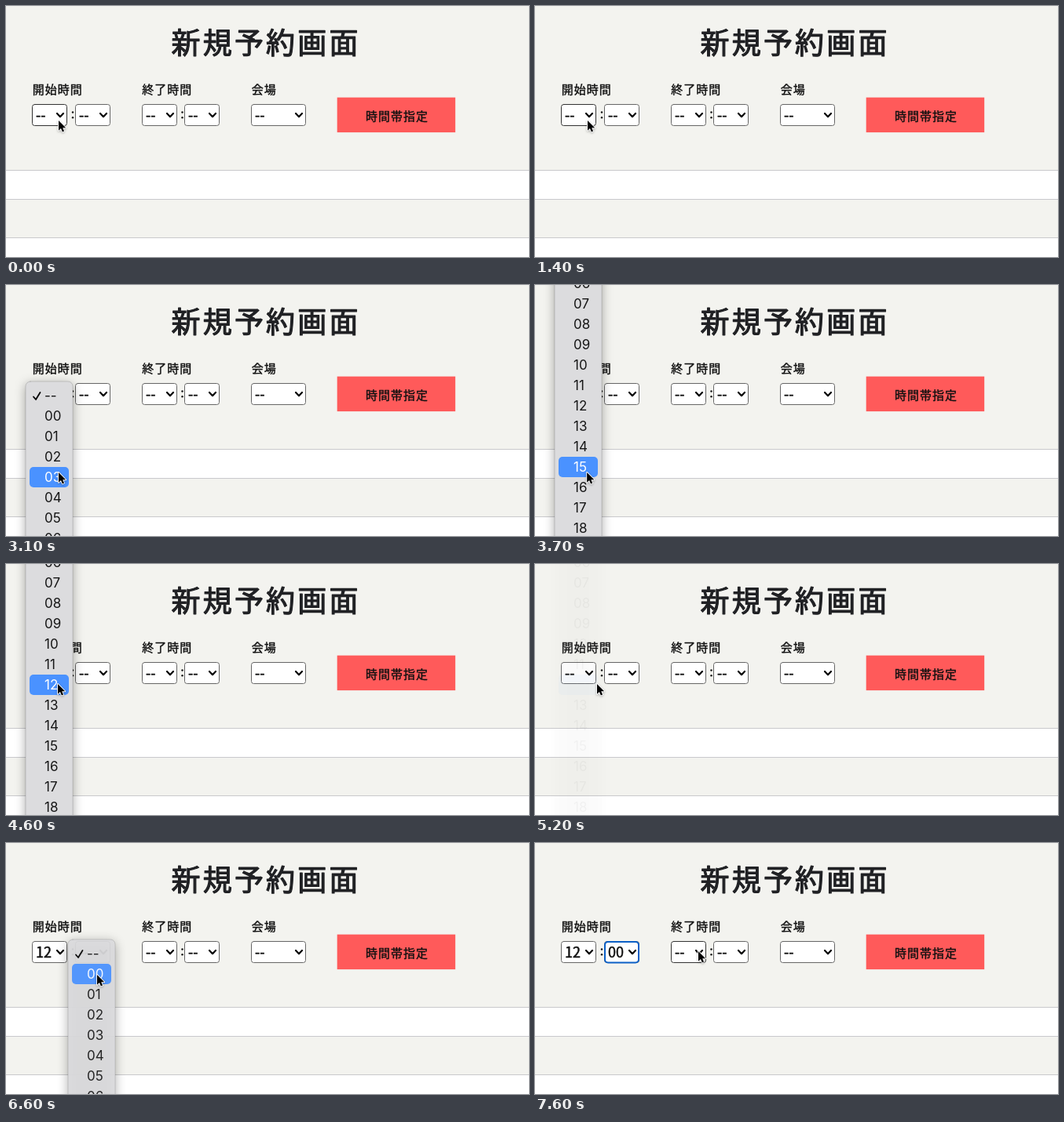
These frames come from a looping animation (666x320 px, 7700 ms). An HTML page with a canvas:

```html
<!DOCTYPE html>
<html lang="ja">
<head>
<meta charset="utf-8">
<style>
  html, body { margin: 0; width: 100%; height: 100%; overflow: hidden; background: #f3f3ef; }
  canvas { display: block; }
</style>
</head>
<body>
<canvas id="stage" width="666" height="320"></canvas>
<script>
const ctx = document.getElementById('stage').getContext('2d');
const LOOP = 7700, STEP = 100, ROW = 26;
const JP = '"Noto Sans CJK JP", "Noto Sans CJK", sans-serif';

// Pointer path: time, x, y
const path = [
  [0, 67, 146], [2200, 67, 146], [2600, 70, 197], [3100, 67, 239], [3900, 66, 239],
  [4600, 66, 153], [4900, 66, 153], [5200, 79, 153], [5700, 116, 146], [6200, 116, 146],
  [6500, 116, 168], [6900, 116, 168], [7100, 122, 152], [7500, 208, 138], [LOOP, 208, 138]
];
const menus = [
  { x: 25, open: 1900, fade: 5000, chosen: 13 },
  { x: 79, open: 6000, fade: 6600, chosen: 1 }
];
const selects = [[33, 45], [88, 45], [173, 45], [227, 45], [312, 70]];

const clamp = v => Math.min(1, Math.max(0, v));
const ease = v => v * v * (3 - 2 * v);
const pad = n => String(n).padStart(2, '0');

function pointerAt(t) {
  const i = path.findIndex(p => p[0] > t);
  const [a, b] = [path[i - 1], path[i]];
  const k = ease((t - a[0]) / (b[0] - a[0]));
  return [a[1] + (b[1] - a[1]) * k, a[2] + (b[2] - a[2]) * k];
}

function rounded(x, y, w, h, r, fill, stroke, lineWidth = 1) {
  ctx.beginPath();
  ctx.roundRect(x, y, w, h, r);
  if (fill) { ctx.fillStyle = fill; ctx.fill(); }
  if (stroke) { ctx.strokeStyle = stroke; ctx.lineWidth = lineWidth; ctx.stroke(); }
}

// A stroke with round joins softens the corners of the letters.
function softText(str, x, y, size, weight, color, spacing = 0) {
  ctx.font = `${size}px ${JP}`;
  ctx.letterSpacing = spacing + 'px';
  ctx.fillStyle = ctx.strokeStyle = color;
  ctx.lineWidth = weight;
  ctx.fillText(str, x, y);
  ctx.strokeText(str, x, y);
  ctx.letterSpacing = '0px';
}
const label = (str, x, y) => softText(str, x, y, 15, 0.4, '#111', 1);

function line(points, width, color = '#000') {
  ctx.beginPath();
  points.forEach(p => ctx.lineTo(...p));
  ctx.strokeStyle = color;
  ctx.lineWidth = width;
  ctx.stroke();
}

function drawPage() {
  ctx.fillStyle = '#f3f3ef';
  ctx.fillRect(0, 0, 666, 320);
  ctx.fillStyle = '#fff';
  ctx.fillRect(0, 210, 666, 36);
  ctx.fillRect(0, 296, 666, 24);
  ctx.fillStyle = '#c9c9cc';
  for (const y of [209, 246, 295]) ctx.fillRect(0, y, 666, 1);

  softText('新規予約画面', 210.5, 61.3, 37, 1.2, '#202124', 3.2);
  label('開始時間', 33.8, 111.5);
  label('終了時間', 173.3, 111.5);
  label('会場', 312.8, 111.5);
  ctx.fillStyle = '#ff5a5a';
  ctx.fillRect(421.7, 116.6, 150.5, 44.5);
  label('時間帯指定', 458, 145.5);
  for (const x of [85, 224.5])
    for (const y of [135.5, 142.3]) rounded(x - 1.2, y - 1.2, 2.4, 2.4, 1.2, '#111');
}

function drawSelect([x, w], value, hovered, focused) {
  rounded(x + 0.5, 125.5, w - 1, 27, 3, '#fff', hovered ? '#333' : '#666');
  if (focused) rounded(x + 1, 126, w - 2, 26.5, 4, null, '#0b5fc6', 2);
  softText(value, x + 5, 146, 18, 0.5, '#111');
  const cx = x + w - 9;
  line([[cx - 4, 137], [cx, 141.2], [cx + 4, 137]], 2.2);
}

function drawMenu(menu, t, py) {
  if (t < menu.open || t >= menu.fade + 300) return;
  const alpha = t < menu.fade ? 1 : [0.93, 0.5, 0.04][Math.floor((t - menu.fade) / STEP)];
  const scroll = menu === menus[0] ? 325 * ease(clamp((t - 3150) / 550)) : 0;
  const top = 123 - scroll, first = top + 5, height = 25 * ROW + 10;
  const active = t < menu.fade ? Math.floor((py - first) / ROW) : menu.chosen;

  ctx.save();
  ctx.globalAlpha = alpha;
  ctx.shadowColor = 'rgba(0,0,0,.35)';
  ctx.shadowBlur = 14;
  ctx.shadowOffsetY = 3;
  rounded(menu.x, top, 60, height, 6, '#dcdcde');
  ctx.shadowColor = 'transparent';
  rounded(menu.x, top, 60, height, 6, null, 'rgba(0,0,0,.14)');
  rounded(menu.x + 5, first + active * ROW, 50, ROW, 5, '#4a92ff');

  ctx.font = '17px Inter, sans-serif';
  for (let i = 0; i < 25; i++) {
    ctx.fillStyle = i === active ? '#fff' : '#161616';
    ctx.fillText(i ? pad(i - 1) : '--', menu.x + 24, first + i * ROW + 19.2);
  }
  ctx.translate(menu.x, first);
  line([[10, 14.5], [13, 18], [18.5, 9]], 1.8, active === 0 ? '#fff' : '#000');
  ctx.restore();
}

const arrow = new Path2D('M0 0V14.2L3.3 11.2L5.4 16L7.8 15L5.8 10.3H10.2Z');
function drawPointer(x, y) {
  ctx.save();
  ctx.translate(x, y);
  ctx.scale(0.9, 0.9);
  ctx.shadowColor = 'rgba(0,0,0,.3)';
  ctx.shadowBlur = 3;
  ctx.shadowOffsetY = 1;
  ctx.strokeStyle = '#fff';
  ctx.lineWidth = 2;
  ctx.stroke(arrow);
  ctx.shadowColor = 'transparent';
  ctx.fillStyle = '#000';
  ctx.fill(arrow);
  ctx.restore();
}

function draw() {
  const t = Math.floor((performance.now() % LOOP) / STEP) * STEP;
  const [px, py] = pointerAt(t);
  const hour = t >= 5300, minute = t >= 6900;
  const values = [hour ? '12' : '--', minute ? '00' : '--', '--', '--', '--'];

  ctx.lineJoin = ctx.lineCap = 'round';
  drawPage();
  selects.forEach((s, i) => {
    const hovered = px >= s[0] && px < s[0] + s[1] && py >= 125 && py < 153;
    const focused = i === 0 ? hour && t < menus[1].open : i === 1 && minute;
    drawSelect(s, values[i], hovered, focused);
  });
  menus.forEach(m => drawMenu(m, t, py));
  drawPointer(px, py);
  requestAnimationFrame(draw);
}
draw();
</script>
</body>
</html>
```
